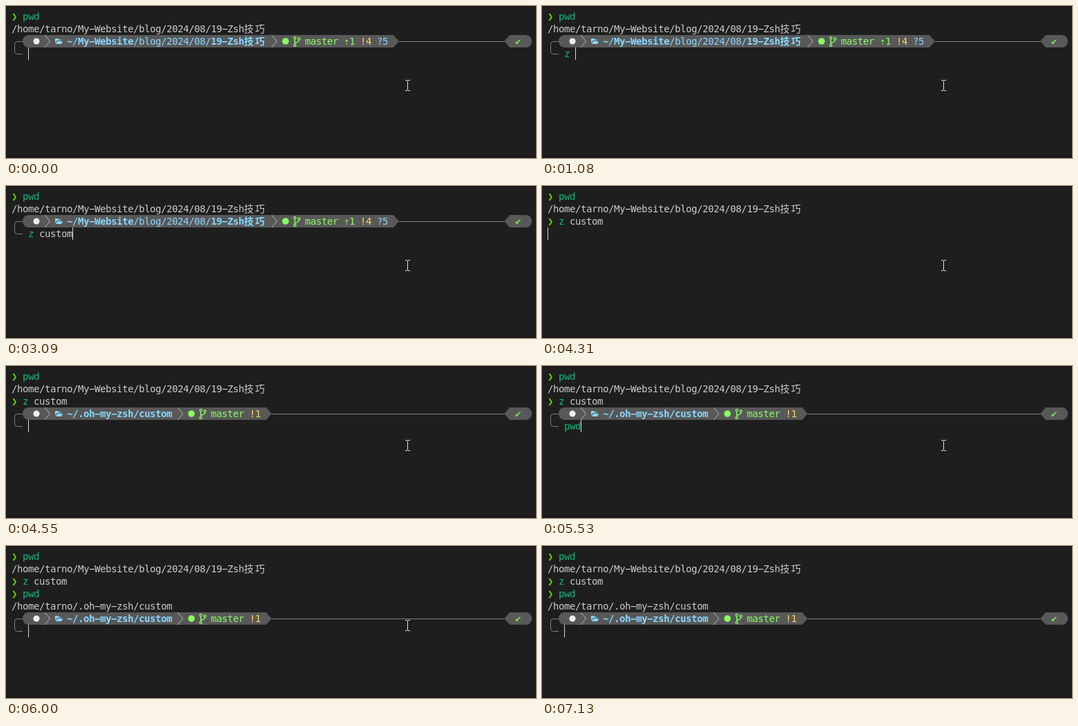
Recreate the animation shown at these times as an HTML page with a canvas. Size 766x220 px, loop 8070 ms.

```html
<!DOCTYPE html>
<html lang="en">
<head>
<meta charset="utf-8">
<title>Terminal: jumping to a directory</title>
<style>
  html, body { margin: 0; width: 100%; height: 100%; overflow: hidden; background: #1e1e1e; }
  canvas { display: block; }
</style>
</head>
<body>
<canvas id="stage" width="766" height="220"></canvas>
<script>
const ctx = document.getElementById('stage').getContext('2d');
const LOOP = 8070, CELL = 8, ROW = 18, LEFT = 8, TOP = 6;
const FONT = '14px "DejaVu Sans Mono", "Noto Sans CJK SC", "Noto Sans CJK", monospace';
const C = {
  back: '#1e1e1e', text: '#cccccc', command: '#0dbc79', hint: '#6a6a6a', arrow: '#5fd700',
  bar: '#585858', divider: '#b8b8b8', frame: '#808080', path: '#87d7ff',
  git: '#87ff5f', changed: '#ffd75f', check: '#87e05f', icon: '#eeeeee'
};

// Keystroke times of the two typed commands, in ms.
const JUMP = { word: 'z custom', keys: [890, 1040, 1410, 1550, 1830, 2160, 2630, 3000], hintFrom: 3 };
const PWD = { word: 'pwd', keys: [5110, 5300, 5490], hintFrom: 1 };
const HOME = '/home/tarno/';

const colX = col => LEFT + col * CELL;
const rowY = row => TOP + row * ROW;

// Draws one glyph per cell and returns the next free column.
function print(col, row, string, color, bold) {
  ctx.font = (bold ? 'bold ' : '') + FONT;
  ctx.fillStyle = color;
  for (const ch of string) {
    ctx.fillText(ch === '-' ? '\u2212' : ch, colX(col), rowY(row) + 14);
    col += ch > '\u3000' ? 2 : 1;
  }
  return col;
}

function fill(color, draw) {
  ctx.fillStyle = color;
  ctx.beginPath();
  draw();
  ctx.fill();
}

function stroke(color, draw, width = 1) {
  ctx.strokeStyle = color;
  ctx.lineWidth = width;
  ctx.beginPath();
  draw();
  ctx.stroke();
}

function polyline(...points) {
  points.forEach(([x, y], i) => i ? ctx.lineTo(x, y) : ctx.moveTo(x, y));
}

function dot(col, row, color, radius) {
  fill(color, () => ctx.arc(colX(col) + 4, rowY(row) + 9, radius, 0, 7));
}

function folder(col, row) {
  const x = colX(col) - 1, y = rowY(row) + 5;
  fill(C.path, () => polyline([x, y + 7], [x, y], [x + 4, y], [x + 5, y + 1.5], [x + 8, y + 1.5],
    [x + 8, y + 3], [x + 2.5, y + 3]));
  fill(C.path, () => polyline([x + 1, y + 8], [x + 3, y + 4], [x + 11, y + 4], [x + 9, y + 8]));
}

function branch(col, row) {
  const x = colX(col) + 1.5, y = rowY(row) + 4;
  stroke(C.git, () => {
    polyline([x, y + 1], [x, y + 10]);
    ctx.moveTo(x + 6, y + 3);
    ctx.quadraticCurveTo(x + 6, y + 6, x, y + 7.5);
  }, 1.4);
  for (const [dx, dy] of [[0, 0], [0, 11], [6, 1.5]]) {
    fill(C.bar, () => ctx.arc(x + dx, y + dy, 1.6, 0, 7));
    stroke(C.git, () => ctx.arc(x + dx, y + dy, 1.6, 0, 7), 1.2);
  }
}

function divider(col, row) {
  const x = colX(col), y = rowY(row);
  stroke(C.divider, () => polyline([x, y], [x + 7.5, y + 9], [x, y + 18]));
}

// A bar segment with one round and one pointed end.
function bar(roundX, tipX, row) {
  const y = rowY(row), dir = Math.sign(tipX - roundX);
  fill(C.bar, () => {
    ctx.ellipse(roundX + dir * 8, y + 9, 8, 9, 0, Math.PI / 2, Math.PI * 1.5, dir < 0);
    ctx.lineTo(tipX - dir * 8, y);
    ctx.lineTo(tipX, y + 9);
    ctx.lineTo(tipX - dir * 8, y + 18);
  });
}

function prompt(row, path, status) {
  const y = rowY(row) + 9.5;
  const length = parts => parts.reduce((n, [s]) => n + [...s].reduce((w, c) => w + (c > '\u3000' ? 2 : 1), 0), 0);
  const gitCol = 10 + length(path) + 1;
  const endCol = gitCol + 12 + length(status) + 1;
  const tip = colX(endCol + 1);

  stroke(C.frame, () => {
    ctx.moveTo(24, y);
    ctx.arcTo(12.5, y, 12.5, y + 9, 4);
    ctx.arcTo(12.5, y + ROW, 24, y + ROW, 4);
    ctx.lineTo(24, y + ROW);
    polyline([tip, y], [720, y]);
  });
  bar(24, tip, row);
  bar(760, 720, row);

  dot(4, row, C.icon, 4.5);
  divider(6, row);
  folder(8, row);
  let col = 10;
  for (const [string, bold] of path) col = print(col, row, string, C.path, bold);
  divider(gitCol, row);
  dot(gitCol + 2, row, C.git, 4.8);
  branch(gitCol + 4, row);
  col = print(gitCol + 6, row, 'master', C.git);
  for (const [string, color] of status) col = print(col, row, string, color);
  print(91, row, '✔', C.check);
}

const blogPrompt = row => prompt(row,
  [['~', true], ['/'], ['My-Website', true], ['/blog/2024/08/'], ['19-Zsh技巧', true]],
  [[' ⇡1', C.git], [' !4', C.changed], [' ?5', C.path]]);

const customPrompt = row => prompt(row, [['~/.oh-my-zsh/custom', true]], [[' !1', C.changed]]);

function cursor(col, row) {
  ctx.fillStyle = '#d8d8d8';
  ctx.fillRect(colX(col), rowY(row), 1, ROW);
}

function command(col, row, string) {
  const split = (string + ' ').indexOf(' ');
  print(col, row, string.slice(0, split), C.command);
  return print(col + split, row, string.slice(split), C.text) ;
}

function typing(row, { word, keys, hintFrom }, t) {
  const count = keys.filter(time => t >= time).length;
  const col = command(3, row, word.slice(0, count));
  if (count >= hintFrom) print(col, row, word.slice(count), C.hint);
  cursor(col, row);
}

function entered(row, string) {
  print(0, row, '❯', C.arrow, true);
  command(2, row, string);
}

function pointer(t) {
  if (t >= 7130) return;
  const step = t < 6800 ? 0 : Math.floor((t - 6800) / 55) + 1;
  const p = (step / 6) ** 1.3;
  const x = Math.round(580 + 163 * p), y = Math.round(115 + 101 * p);
  ctx.fillStyle = '#e6e6e6';
  for (const end of [y - 8, y + 7]) {
    ctx.fillRect(x - 3, end, 3, 1);
    ctx.fillRect(x + 1, end, 3, 1);
  }
  ctx.fillRect(x, y - 7, 1, 14);
}

function draw(t) {
  ctx.fillStyle = C.back;
  ctx.fillRect(0, 0, 766, 220);
  ctx.fillStyle = '#0c0c0c';
  ctx.fillRect(0, 0, 766, 1);
  ctx.fillStyle = '#1a1a1a';
  ctx.fillRect(0, 216, 766, 4);

  entered(0, 'pwd');
  print(0, 1, HOME + 'My-Website/blog/2024/08/19-Zsh技巧', C.text);
  if (t < 4310) {
    blogPrompt(2);
    typing(3, JUMP, t);
  } else {
    entered(2, JUMP.word);
    if (t < 4360) {
      cursor(0, 3);
    } else if (t < 5910) {
      customPrompt(3);
      typing(4, PWD, t);
    } else {
      entered(3, PWD.word);
      print(0, 4, HOME + '.oh-my-zsh/custom', C.text);
      if (t < 5955) {
        cursor(0, 5);
      } else {
        customPrompt(5);
        cursor(3, 6);
      }
    }
  }
  pointer(t);
}

function tick() {
  draw(performance.now() % LOOP);
  requestAnimationFrame(tick);
}
tick();
</script>
</body>
</html>
```
